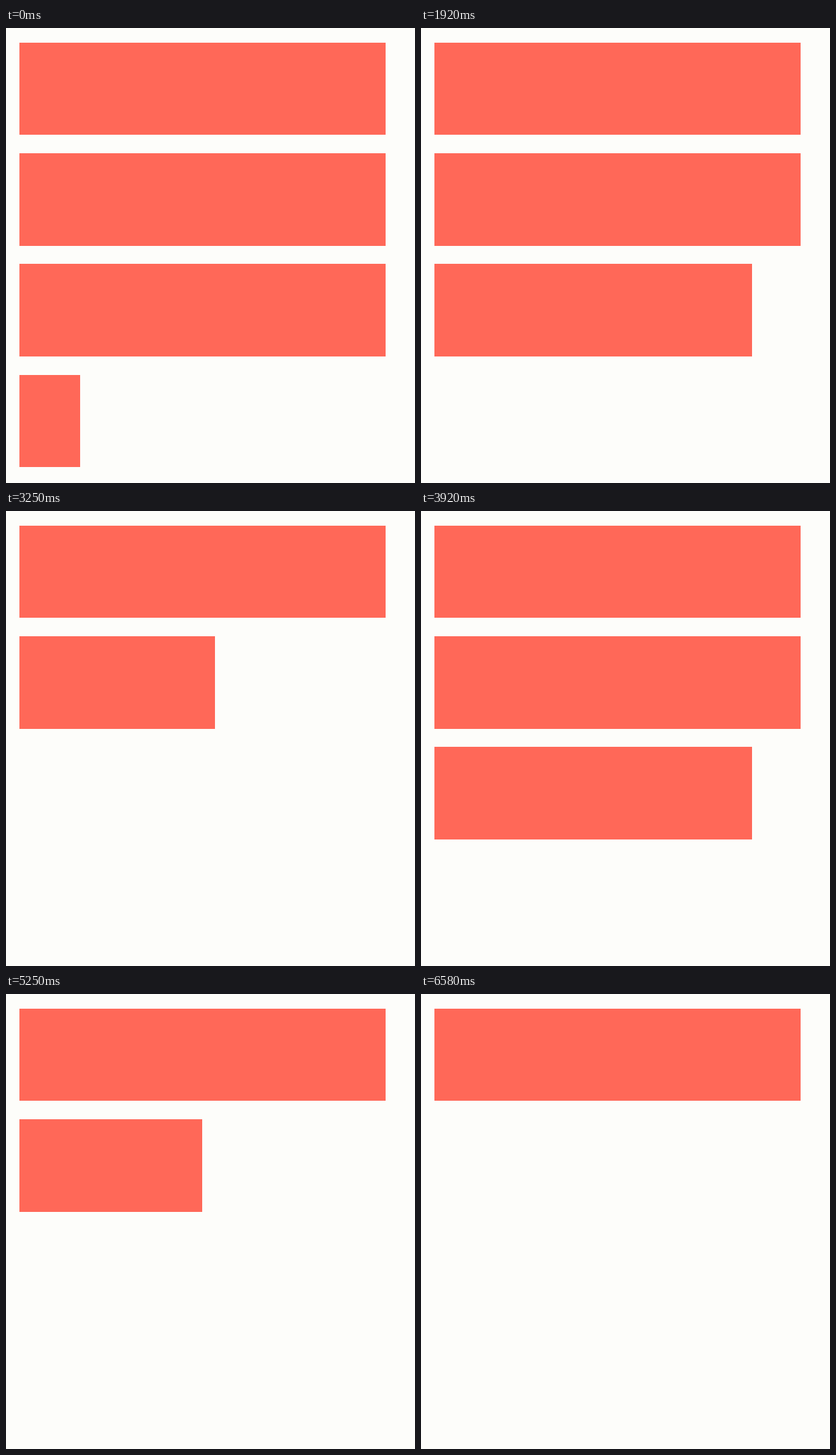
Animation of 640x712 px, one loop 6.66 s. Source, as an HTML page:

```html
<!DOCTYPE html>
<html lang="en">
<head>
<meta charset="utf-8">
<title>Filling bars</title>
<style>
  html, body { margin: 0; width: 100%; height: 100%; overflow: hidden; background: #fdfdfa; }
  svg { display: block; width: 640px; height: 712px; }
  rect { fill: #ff6858; shape-rendering: crispEdges; }
</style>
</head>
<body>
<svg id="stage" viewBox="0 0 640 712"></svg>
<script>
  const LOOP = 6660;
  const FRAME = 1000 / 12;
  const TICKS_PER_FRAME = 5;
  const FILL_TICKS = 30;
  const RESET_TICK = 115;
  const CYCLE_STARTS = [-85, 35, 155, 276];
  const ROW_DELAYS = [0, 24, 54, 80];
  const BAR = { x: 20.8, y: 23.1, width: 573.2, height: 144.3, pitch: 173.15 };

  const stage = document.getElementById('stage');
  const bars = ROW_DELAYS.map((_, row) => {
    const rect = document.createElementNS('http://www.w3.org/2000/svg', 'rect');
    rect.setAttribute('x', BAR.x);
    rect.setAttribute('y', BAR.y + row * BAR.pitch);
    rect.setAttribute('height', BAR.height);
    stage.appendChild(rect);
    return rect;
  });

  const clamp01 = v => Math.min(1, Math.max(0, v));

  // The picture advances at 12 fps, with delays rounded to 10 ms.
  function tickAt(ms) {
    const rounded = Math.floor(ms / 10) * 10 + 4;
    return Math.floor(rounded / FRAME) * TICKS_PER_FRAME;
  }

  // The lower rows clear shortly before the first one restarts.
  function fillOf(row, tick) {
    if (row > 0 && tick >= RESET_TICK) return 0;
    return clamp01((tick - ROW_DELAYS[row]) / FILL_TICKS);
  }

  function render(ms) {
    const tick = tickAt(ms % LOOP);
    const start = CYCLE_STARTS.filter(s => s <= tick).pop();
    bars.forEach((bar, row) => {
      bar.setAttribute('width', BAR.width * fillOf(row, tick - start));
    });
  }

  const origin = performance.now();
  function loop() {
    render(performance.now() - origin);
    requestAnimationFrame(loop);
  }
  loop();
</script>
</body>
</html>
```
